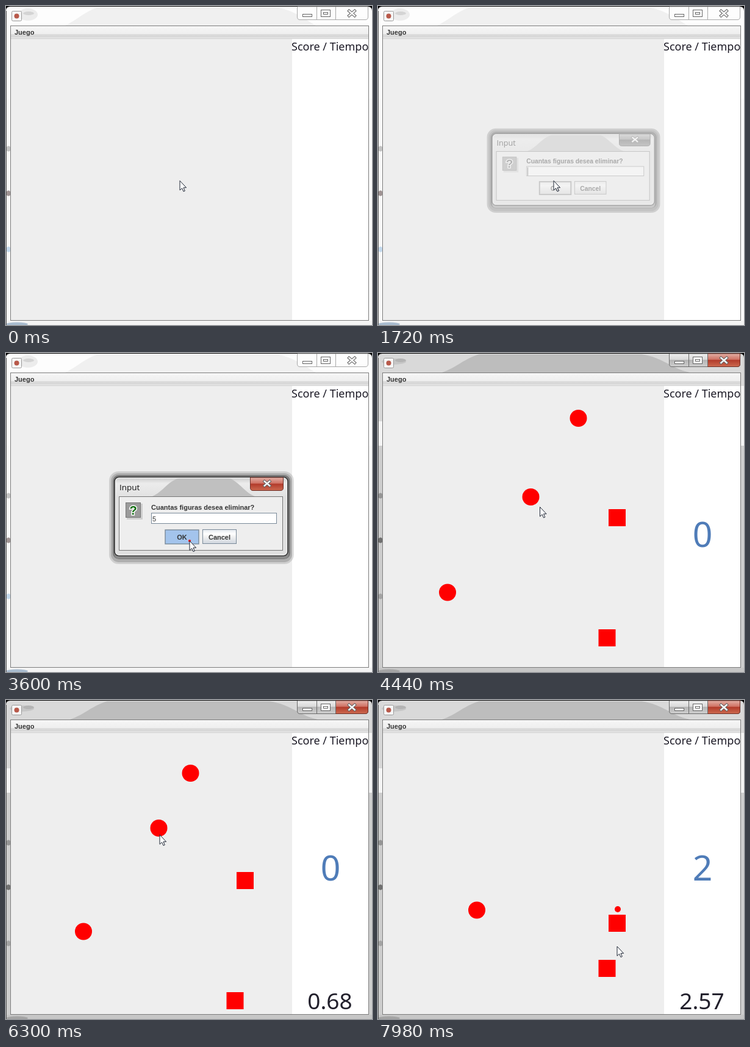
An HTML page that plays this animation: 600 px wide and 523 px high, repeating every 8000 ms.

```html
<!DOCTYPE html>
<html lang="es">
<head>
<meta charset="utf-8">
<title>Juego</title>
<style>
html, body { margin: 0; width: 100%; height: 100%; overflow: hidden; background: #000; }
svg { display: block; width: 600px; height: 523px; }
.ui { font: bold 11px "Liberation Sans", Arial, sans-serif; fill: #333; }
.head { font: 18px "Noto Sans", "Open Sans", sans-serif; fill: #1c1a26; }
.title { font: 13.5px "Open Sans", "Noto Sans", sans-serif; fill: #111; }
.num { font-family: "Noto Sans", "Open Sans", sans-serif; text-anchor: middle; }
.one { font-family: "DejaVu Sans", sans-serif; }
.mid { text-anchor: middle; }
</style>
</head>
<body>
<svg id="stage" viewBox="0 0 600 523" xmlns="http://www.w3.org/2000/svg"></svg>
<script>
const LOOP = 8000, START = 5700, TICK = 47;

const rect = (x, y, w, h, fill, extra = "") =>
  `<rect x="${x}" y="${y}" width="${w}" height="${h}" fill="${fill}" ${extra}/>`;
const path = (d, fill, extra = "") => `<path d="${d}" fill="${fill}" ${extra}/>`;
const blob = (x, y, rx, ry, fill) =>
  `<ellipse cx="${x}" cy="${y}" rx="${rx}" ry="${ry}" fill="${fill}"/>`;
const gradient = (id, stops) =>
  `<linearGradient id="${id}" x1="0" y1="0" x2="0" y2="1">` +
  stops.map(([at, c]) => `<stop offset="${at}" stop-color="${c}"/>`).join("") +
  `</linearGradient>`;

const defs = "<defs>" +
  gradient("red", [[0, "#e3b0a6"], [.45, "#cf7163"], [.5, "#b23a2a"], [1, "#cc6a50"]]) +
  gradient("glass", [[0, "#f0f0f0"], [.45, "#d9d9d9"], [.5, "#b4b4b4"], [1, "#d0d0d0"]]) +
  gradient("bar", [[0, "#f6f6f6"], [.66, "#eee"], [.68, "#d9d9d9"], [.95, "#d9d9d9"], [.96, "#eee"]]) +
  gradient("button", [[0, "#e4e9ee"], [.3, "#ffffff"], [.5, "#f2f2f2"], [1, "#cfd6de"]]) +
  gradient("cap", [[0, "#cfcfcf"], [.3, "#ececec"], [1, "#e2e2e2"]]) +
  `<clipPath id="frame"><path d="M0 523V8Q0 1 7 1H593Q600 1 600 8V523Z"/></clipPath></defs>`;

function cross(x, y, w, h) {
  const d = `M${x - w} ${y - h}L${x + w} ${y + h}M${x + w} ${y - h}L${x - w} ${y + h}`;
  return path(d, "none", 'stroke="#666" stroke-width="4.6" stroke-linecap="square"') +
    path(d, "none", 'stroke="#fff" stroke-width="2.4" stroke-linecap="square"');
}

function captionButtons(active) {
  const fill = active ? "url(#glass)" : "#fdfdfd", line = active ? "#6a6a6a" : "#a8a8a8";
  const icon = 'stroke="#666"';
  return path("M477.5 1V18Q477.5 22.5 482 22.5H589Q593.5 22.5 593.5 18V1Z", fill, `stroke="${line}"`) +
    (active ? path("M540.5 1H593.5V18Q593.5 22.5 589 22.5H540.5Z", "url(#red)", 'stroke="#6e3028"') : "") +
    path("M509.5 1V22M540.5 1V22", "none", `stroke="${line}"`) +
    rect(486.5, 13.5, 15, 4, "#fff", icon) +
    rect(516.5, 6.5, 15, 11, "#fff", icon) + rect(520.5, 10.5, 7, 3, "#fff", icon) +
    cross(567, 12, 4.6, 4);
}

function chrome(active) {
  const c = active
    ? { base: "#d9d9d9", arch: "#bdbdbd", side: "#cecece", foot: "#c6c6c6", spots: ["#969696", "#707070", "#a4a4a4"] }
    : { base: "#fdfdfd", arch: "#f0f0f0", side: "#fafafa", foot: "#f4f4f4", spots: ["#c4c4c4", "#a09494", "#c4daee"] };
  const arch = active
    ? "M105 32C130 23 140 10 166 2H432C470 8 480 26 512 32Z"
    : "M97 32C118 22 130 8 152 2H440C470 5 490 22 508 32Z";
  return `<g clip-path="url(#frame)">` +
    rect(0, 0, 600, 523, c.base) +
    path(arch, c.arch) +
    (active ? blob(26, 14, 20, 5, "#c6c6c6") : blob(36, 14, 16, 10, "#ececec")) +
    blob(37, 12, 9, 3, active ? "#b4b4b4" : "#d4d4d4") +
    rect(0, 152, 8, 371, c.side) + rect(594, 152, 6, 371, c.side) +
    (active ? rect(0, 112, 8, 40, "#f7f7f7") + rect(594, 54, 6, 98, "#f4f4f4") : "") +
    rect(0, 516, 600, 7, c.foot) +
    c.spots.map((s, i) => blob(4, [234, 307, 399][i], 3.5, 4.5, s)).join("") +
    blob(18, 521.5, 18, 3, active ? "#a4a4a4" : "#a9bccf") +
    rect(0, 8, 1, 515, "#555") +
    `</g>` +
    captionButtons(active);
}

const windowBody =
  rect(9.5, 8.5, 16, 16, "#f6f6f6", 'rx="2" stroke="#9a9a9a"') +
  `<circle cx="17.5" cy="16.5" r="4" fill="#b8594a"/>` +
  rect(8, 33, 586, 482, "#eee") +
  rect(8, 33, 586, 20, "url(#bar)") + rect(8, 53, 586, 1, "#ccc") +
  rect(469, 54, 125, 461, "#fff") +
  rect(7.5, 32.5, 587, 483, "none", 'stroke="#7c7c7c"') +
  `<text class="ui" x="14" y="47">Juego</text>` +
  `<text class="head" x="468" y="72.5">Score / Tiempo</text>`;

const dialogBody =
  rect(172, 198, 297, 146, "#000", 'rx="13" opacity=".16"') +
  rect(175, 201, 291, 138, "#000", 'rx="10" opacity=".3"') +
  rect(178, 204.5, 284, 129, "#e0e0e0", 'rx="7" stroke="#333" stroke-width="1.6"') +
  rect(180, 206, 280, 30, "url(#cap)", 'rx="5"') +
  path("M240 236C258 228 264 212 284 206H366C384 214 392 230 408 236Z", "#c0c0c0") +
  rect(179.5, 206, 281, 126, "none", 'rx="6" stroke="#f5f5f5"') +
  path("M400.5 205V222Q400.5 226.5 405 226.5H450Q454.5 226.5 454.5 222V205Z", "url(#red)", 'stroke="#6e3028"') +
  cross(428, 215, 4.2, 3.6) +
  `<text class="title" x="186" y="226">Input</text>` +
  rect(185.5, 236.5, 268, 88, "#eee", 'stroke="#777"') +
  rect(198, 248, 26, 26, "#cfcfcf") + rect(196.5, 246.5, 24, 24, "#9b9b9b", 'stroke="#777"') +
  `<text class="ui mid" x="208.5" y="266" style="font-size:20px;fill:#0a6a0a;stroke:#fff;stroke-width:3;paint-order:stroke">?</text>` +
  `<text class="ui" x="238" y="258">Cuantas figuras desea eliminar?</text>` +
  rect(238.5, 263.5, 205, 17, "#fff", 'stroke="#7a8a99"') +
  `<text id="typed" class="ui" x="240" y="277" style="font-weight:normal">5</text>` +
  rect(240, 265, 1, 15, "#333", 'id="caret"') +
  rect(261, 291, 55, 23, "url(#button)", 'id="ok" stroke="#7a8a99" stroke-width="2"') +
  rect(322.5, 290.5, 55, 23, "url(#button)", 'stroke="#7a8a99"') +
  `<text class="ui mid" x="288.5" y="307">OK</text>` +
  `<text class="ui mid" x="350" y="307">Cancel</text>`;

const disc = id => `<circle id="${id}" r="14" fill="#f00"/>`;
const square = id => `<rect id="${id}" x="-14" y="-14" width="28" height="28" fill="#f00"/>`;

document.getElementById("stage").innerHTML = defs +
  rect(0, 0, 600, 523, "#000") +
  `<g id="inactive">${chrome(false)}</g><g id="active">${chrome(true)}</g>` +
  windowBody +
  `<g id="game">${disc("falling")}${disc("rising")}${disc("slow")}${square("lower")}${square("bouncing")}
    <text id="score" class="num" x="532" font-size="57" fill="#4f7cb8"></text>
    <text id="clock" class="num" x="531" y="507" font-size="37" fill="#22202c"></text></g>` +
  `<g id="dialog">` +
  rect(173.5, 199.5, 294, 143, "none", 'rx="11" stroke="#000" stroke-width="9" opacity=".13"') +
  `<g id="pane">${dialogBody}</g></g><circle id="click" fill="#f00"/>` +
  `<g id="cursor">${path("M0 0V15.5L3.6 12.2L6 17.6L8.3 16.6L6 11.3H10.6Z", "#fff", 'stroke="#1c2433"')}</g>`;

const el = {};
document.querySelectorAll("[id]").forEach(e => el[e.id] = e);

// Each key is [time, value, ...].
function lerp(keys, t) {
  let i = 0;
  while (i < keys.length - 1 && keys[i + 1][0] <= t) i++;
  const a = keys[i], b = keys[i + 1];
  if (!b || t <= a[0]) return a.slice(1);
  const k = (t - a[0]) / (b[0] - a[0]);
  return a.slice(1).map((v, j) => v + (b[j + 1] - v) * k);
}

const pointer = [
  [0, 285, 286.5], [1719, 285, 286.5], [1720, 288, 286.5], [2200, 312, 295], [2379, 312, 295],
  [2380, 313, 296], [2990, 313, 296], [3300, 306, 304], [3600, 301, 308], [3660, 301, 308],
  [3780, 312, 312], [4440, 265.5, 252.5], [5700, 265.5, 252.5], [6300, 252, 221], [6480, 251, 219],
  [7200, 266.5, 139.5], [7380, 270, 117], [7920, 393, 343], [7980, 392, 404]
];
const seconds = [[5700, 0], [6300, .68], [7200, 1.70], [7980, 2.57]];
const dialogFade = [[1720, .36, .937, .91], [1960, 1, 1, 1], [3600, 1, 1, 1], [3720, .25, .93, .9]];
const clicks = [3600, 6420, 7260, 7920];

const show = (e, on) => e.style.display = on ? "" : "none";
const move = (e, x, y) => e.setAttribute("transform", `translate(${x} ${y})`);
const digits = s => s.replace(/1/g, '<tspan class="one">1</tspan>');

function drawDialog(t, q) {
  const open = t >= 1720 && q < 3780;
  show(el.dialog, open);
  if (!open) return;
  const [alpha, sx, sy] = lerp(dialogFade, q);
  el.pane.setAttribute("opacity", alpha);
  // Faint panes look colourless.
  el.pane.style.filter = alpha < .5 ? "grayscale(1)" : "";
  el.dialog.setAttribute("transform", `translate(321 269) scale(${sx} ${sy}) translate(-321 -270)`);
  show(el.typed, t >= 2990);
  show(el.caret, t < 2730);
  const pressed = t >= 3600;
  el.ok.setAttribute("fill", pressed ? "#a3c4ec" : "url(#button)");
  el.ok.setAttribute("stroke-width", pressed ? 1.4 : 2);
}

function drawGame(q) {
  show(el.game, q >= 3720);
  const running = q >= START;
  const n = running ? Math.floor((q - START + 12) / TICK) : 0;
  const down = 467 + 2 * n;
  move(el.falling, 328.5 - 2 * n, 107 + n);
  move(el.rising, 250.5, 236 - 2 * n);
  move(el.slow, 114 + n, 392.5 - n);
  move(el.lower, 392, 270 + 2 * n);
  move(el.bouncing, 375.5, down > 501 ? 1003 - down : down);
  show(el.rising, q < 6480);
  show(el.falling, q < 7260);
  el.score.innerHTML = digits(q < 6480 ? "0" : q < 7260 ? "1" : "2");
  el.score.setAttribute("y", running ? 296 : 318);
  show(el.clock, running);
  el.clock.innerHTML = digits(lerp(seconds, q)[0].toFixed(2));
}

function draw(t) {
  const phase = t < 2900 ? 40 : 0;
  const q = Math.floor((t - phase) / 60) * 60 + phase;
  const active = t >= 500 && t < 1720 || t >= 3660;
  show(el.active, active);
  show(el.inactive, !active);
  drawGame(q);
  drawDialog(t, q);
  move(el.cursor, ...lerp(pointer, q));
  const hit = clicks.find(c => q >= c && q < c + 120);
  show(el.click, hit !== undefined);
  if (hit !== undefined) {
    move(el.click, ...lerp(pointer, hit));
    el.click.setAttribute("r", q === hit ? 2 : 5);
  }
}

const begun = performance.now();
function loop() {
  draw((performance.now() - begun) % LOOP);
  requestAnimationFrame(loop);
}
loop();
</script>
</body>
</html>
```
